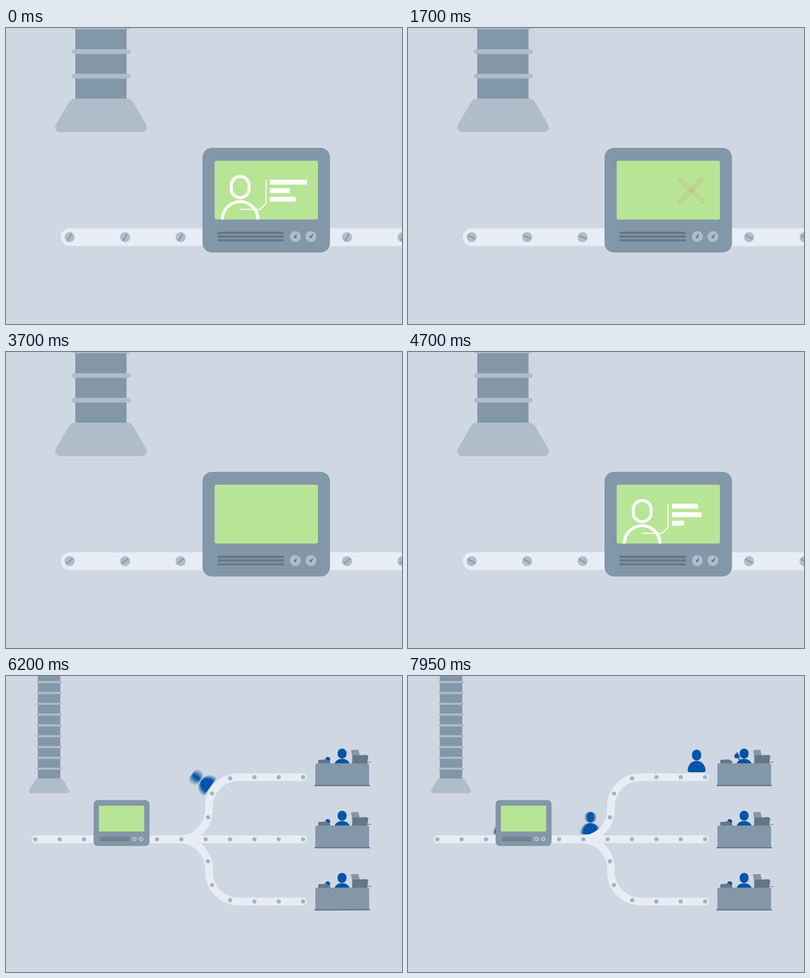
Animation of 800 by 600 pixels, one loop 8 s. Source, as an HTML page with a canvas:

```html
<!DOCTYPE html>
<html lang="en">
<head>
<meta charset="utf-8">
<title>Candidate conveyor</title>
<style>
  html, body { margin: 0; width: 100%; height: 100%; overflow: hidden; background: #cfd7e2; }
  canvas { display: block; width: 800px; height: 600px; }
</style>
</head>
<body>
<canvas id="stage" width="800" height="600"></canvas>
<script>
const LOOP = 8000, SHUTTER = 25, SAMPLES = 10;
const BACK = '#cfd7e2', BELT = '#e8edf5', STEEL = '#8297a8', LIGHT = '#aebdc9',
      DARK = '#637786', BLUE = '#0054a9', SCREEN = '#b8e595', GREEN = '#68b547', RED = '#e0564f';

const stage = document.getElementById('stage').getContext('2d');
const layer = document.createElement('canvas');
layer.width = 800;
layer.height = 600;
const c = layer.getContext('2d');

// World units are stage pixels before the camera pulls back.
const FAR = { scale: 0.4387, x: 2.8, y: 145 };
const BELT_Y = 424, STEP = 112.1, FIRST = 128.5, FORK = 791.4, R = 136.8, RISE = 287.2;
const ARC = R * Math.PI / 2, LINK = RISE - 2 * R, LAST = FIRST + 11 * STEP;
const SCAN_X = 525, HOOD_X = 192;

const clamp = v => Math.min(1, Math.max(0, v));
const ramp = (t, start, length) => clamp((t - start) / length);
const smooth = u => u * u * (3 - 2 * u);
const ease = (t, start, length) => smooth(ramp(t, start, length));
const mix = (a, b, u) => a + (b - a) * u;
const backOut = u => 1 + 2.7 * (u - 1) ** 3 + 1.7 * (u - 1) ** 2;

function keyed(t, keys) {
  const i = Math.max(1, keys.findIndex(k => k[0] >= t));
  const [a, b] = [keys[i - 1], keys[i]];
  return mix(a[1], b[1], ramp(t, a[0], b[0] - a[0]));
}

function box(x, y, w, h, r, color) {
  c.beginPath();
  c.roundRect(x, y, w, h, r);
  c.fillStyle = color;
  c.fill();
}

function dot(x, y, r, color) {
  c.beginPath();
  c.arc(x, y, r, 0, 7);
  c.fillStyle = color;
  c.fill();
}

function polygon(points, color) {
  c.beginPath();
  points.forEach(p => c.lineTo(...p));
  c.fillStyle = color;
  c.fill();
}

function line(points, width, color, cap = 'round') {
  c.beginPath();
  points.forEach(p => c.lineTo(...p));
  c.lineWidth = width;
  c.lineCap = cap;
  c.lineJoin = cap === 'round' ? 'round' : 'miter';
  c.strokeStyle = color;
  c.stroke();
}

function placed(x, y, angle, scale, draw) {
  c.save();
  c.translate(x, y);
  c.rotate(angle);
  c.scale(scale, scale);
  draw();
  c.restore();
}

// Centre line of a branch: side -1 goes up, 1 goes down, 0 runs straight.
function track(d, side) {
  let s = d - FORK;
  if (!side || s <= 0) return { x: d, y: BELT_Y, angle: 0 };
  const at = (x, y, angle) => ({ x: FORK + x, y: BELT_Y + side * y, angle: side * angle });
  if (s < ARC) return at(R * Math.sin(s / R), R * (1 - Math.cos(s / R)), s / R);
  s -= ARC;
  if (s < LINK) return at(R, R + s, Math.PI / 2);
  s -= LINK;
  if (s < ARC) {
    const a = s / R;
    return at(2 * R - R * Math.cos(a), R + LINK + R * Math.sin(a), Math.PI / 2 - a);
  }
  return at(2 * R + s - ARC, RISE, 0);
}

const trackEnd = side => side ? LAST + 2 * ARC + LINK - 2 * R : LAST;

const SCREW_TURN = [[0, -60], [1700, 25], [2800, 60], [3100, 173], [3800, 345], [4700, 390],
                    [5200, 398], [6200, 570], [8000, 705]];

function drawBelts(t) {
  for (const side of [-1, 0, 1]) {
    c.beginPath();
    for (let d = FIRST; d < trackEnd(side); d += 6) {
      const p = track(d, side);
      c.lineTo(p.x, p.y);
    }
    const end = track(trackEnd(side), side);
    c.lineTo(end.x, end.y);
    c.lineWidth = 35.3;
    c.lineCap = c.lineJoin = 'round';
    c.strokeStyle = BELT;
    c.stroke();
  }
  const turn = keyed(t, SCREW_TURN) * Math.PI / 180;
  for (const side of [-1, 0, 1]) {
    const count = side ? 6 : 12;
    for (let i = 0; i < count; i++) {
      const p = track(trackEnd(side) - i * STEP, side);
      dot(p.x, p.y, 10.2, LIGHT);
      placed(p.x, p.y, turn, 1, () => line([[-7, 0], [7, 0]], 2.6, STEEL));
    }
  }
}

function drawPerson() {
  box(-21, -104, 42, 50, 21, BLUE);
  c.beginPath();
  c.moveTo(-33, 0);
  c.quadraticCurveTo(-41, 0, -41, -9);
  c.bezierCurveTo(-39, -34, -23, -52, 0, -52);
  c.bezierCurveTo(23, -52, 39, -34, 41, -9);
  c.quadraticCurveTo(41, 0, 33, 0);
  c.fill();
}

// enter: belt starts to carry the person; leave: the person moves on to a desk
const CANDIDATES = [
  { enter: 2800, leave: 5200, side: -1 },
  { enter: 5050, leave: 7200, side: 0 },
  { enter: 7300, leave: 9500, side: 1 }
];

function drawCandidate(t, { enter, leave, side }) {
  const fall = ramp(t, enter - 300, 250);
  if (!fall) return;
  const stop = trackEnd(side) - 39;
  const d = mix(HOOD_X, SCAN_X, ease(t, enter, 1000)) + (stop - SCAN_X) * ease(t, leave, 1770);
  const p = track(d, side);
  placed(p.x, p.y, p.angle, 1, () => {
    c.translate(0, -23 - 190 * (1 - fall * fall));
    drawPerson();
  });
}

function drawHood() {
  box(140, -420, 103.5, 570, 0, STEEL);
  for (let i = 0; i < 11; i++) box(133, 93 - 50 * i, 119, 9.5, 4.75, LIGHT);
  c.beginPath();
  c.moveTo(192, 143);
  c.arcTo(252.5, 143, 292, 211, 16);
  c.arcTo(292, 211, 192, 211, 10);
  c.arcTo(92, 211, 131.5, 143, 10);
  c.arcTo(131.5, 143, 192, 143, 16);
  c.closePath();
  c.fillStyle = LIGHT;
  c.fill();
}

const SCANS = [
  { show: -500, verdict: 600, hide: 1350, bars: [75, 40.5, 52], pass: false },
  { show: 4080, verdict: 5120, hide: 5500, bars: [53, 60, 24.5], pass: true },
  { show: 6230, verdict: 7050, hide: 7450, bars: [66, 34, 48], pass: true }
];

function drawScan(t, { show, verdict, hide, bars, pass }) {
  const reveal = ease(t, show, 320);
  c.globalAlpha = reveal * (1 - ramp(t, verdict - 20, 160));
  if (c.globalAlpha > 0) {
    c.strokeStyle = '#fff';
    c.lineWidth = 6;
    c.beginPath();
    c.roundRect(455, 301, 36, 43, 18);
    c.stroke();
    c.beginPath();
    c.arc(473, 388, 36, Math.PI, 0);
    c.stroke();
    line([[472.5, 367.5], [513.5, 367.5], [525.2, 355.5], [525.2, 308]], 2.2, '#fff', 'butt');
    bars.forEach((w, i) => box(533, 307.5 + 17.2 * i, w * reveal, 10, 1, '#fff'));
  }
  const pop = ramp(t, verdict, pass ? 200 : 350);
  c.globalAlpha = pop * (1 - 0.9 * ramp(t, hide, 340)) * (1 - ramp(t, hide + 340, 60));
  if (c.globalAlpha > 0) {
    placed(572, 328.5, 0, mix(2.6, 1, smooth(pop)), () => {
      if (pass) line([[-24, 1], [-7, 18], [26, -18]], 11, GREEN);
      else {
        line([[-22, -22], [22, 22]], 11.5, RED);
        line([[-22, 22], [22, -22]], 11.5, RED);
      }
    });
  }
  c.globalAlpha = 1;
}

// A rejected candidate leaves below the scanner in strips.
function drawStrips(t) {
  const out = ease(t, 600, 230);
  c.globalAlpha = 1 - ease(t, 950, 350);
  if (out && c.globalAlpha) {
    for (let i = 0; i < 6; i++) box(486 + 14 * i, 380, 8, 60 + 83 * out, 2, BLUE);
  }
  c.globalAlpha = 1;
}

function drawScanner(t) {
  box(397, 243, 257.5, 212, 19, STEEL);
  box(421.5, 269, 208.7, 119.3, 4, SCREEN);
  c.save();
  c.clip();
  SCANS.forEach(scan => drawScan(t, scan));
  c.restore();
  for (let i = 0; i < 3; i++) box(427, 413 + 7.6 * i, 134.3, 4.4, 1.5, DARK);
  for (const [x, lean] of [[584.5, 2.2], [616, 4.2]]) {
    dot(x, 422.7, 11, LIGHT);
    dot(x - 0.3, 423.5, 2.5, DARK);
    line([[x - 0.3, 423.5], [x + lean, 418.3]], 2, DARK);
  }
}

// Desk coordinates: origin at the middle of the table top, in far-view pixels.
function drawDesk(t, answers) {
  const lift = answers ? ease(t, 7150, 400) : 0;
  const shake = lift * Math.sin(t / 45) * 0.5;
  box(-9, -30, 18, 20.5, 9, BLUE);
  c.beginPath();
  c.ellipse(0, 2, 15, 11, 0, Math.PI, 0);
  c.fill();
  const x = mix(-29, -15, lift), y = mix(-8, -15, lift) + shake;
  if (lift) {
    placed(x + 3, y, mix(-1.5, -0.35, lift), 1, () => {
      line([[0, -6], [2, 0], [0, 6]], 2.2, DARK);
      dot(0, -6, 2.3, DARK);
      dot(0, 6, 2.3, DARK);
    });
  }
  dot(x, y, 4.9, BLUE);
  polygon([[-48, -7], [-31, -8], [-24, -4], [-24, 1], [-48, 1]], DARK);
  polygon([[18, -27], [33, -27.5], [37, -10], [21, -10]], STEEL);
  polygon([[21, -16], [50, -17], [53, -14], [51, -3], [59, -3], [59, -1.7], [51, -1.7], [51, 1], [20, 1]], DARK);
  box(-54, 0, 108.5, 45, [4, 4, 0, 0], STEEL);
  box(-56, 43.7, 112.5, 2.5, 1, DARK);
}

function drawDesks(t) {
  for (let i = 0; i < 3; i++) {
    const u = ramp(t, 5450 + 200 * i, 350);
    if (!u) continue;
    const x = (679 - FAR.x) / FAR.scale, y = (190 + 126 * i - FAR.y) / FAR.scale;
    placed(x, y, (u - 1) * 0.6, Math.max(0, backOut(u)) / FAR.scale, () => {
      c.translate(0, -13);
      drawDesk(t, i === 0);
    });
  }
}

function drawScene(t) {
  const zoom = ease(t, 4806, 500);
  const scale = mix(1, FAR.scale, zoom);
  c.setTransform(1, 0, 0, 1, 0, 0);
  c.fillStyle = BACK;
  c.fillRect(0, 0, 800, 600);
  c.setTransform(scale, 0, 0, scale, FAR.x * zoom, FAR.y * zoom);
  CANDIDATES.forEach(person => drawCandidate(t, person));
  drawBelts(t);
  drawStrips(t);
  drawHood();
  drawScanner(t);
  drawDesks(t);
}

// Average several moments inside the shutter time for motion blur.
function frame(now) {
  const t = now % LOOP;
  for (let i = 0; i < SAMPLES; i++) {
    const moment = t + SHUTTER * ((i + 0.5) / SAMPLES - 0.5);
    drawScene(Math.min(LOOP, Math.max(0, moment)));
    stage.globalAlpha = 1 / (i + 1);
    stage.drawImage(layer, 0, 0);
  }
  requestAnimationFrame(frame);
}
requestAnimationFrame(frame);
</script>
</body>
</html>
```
